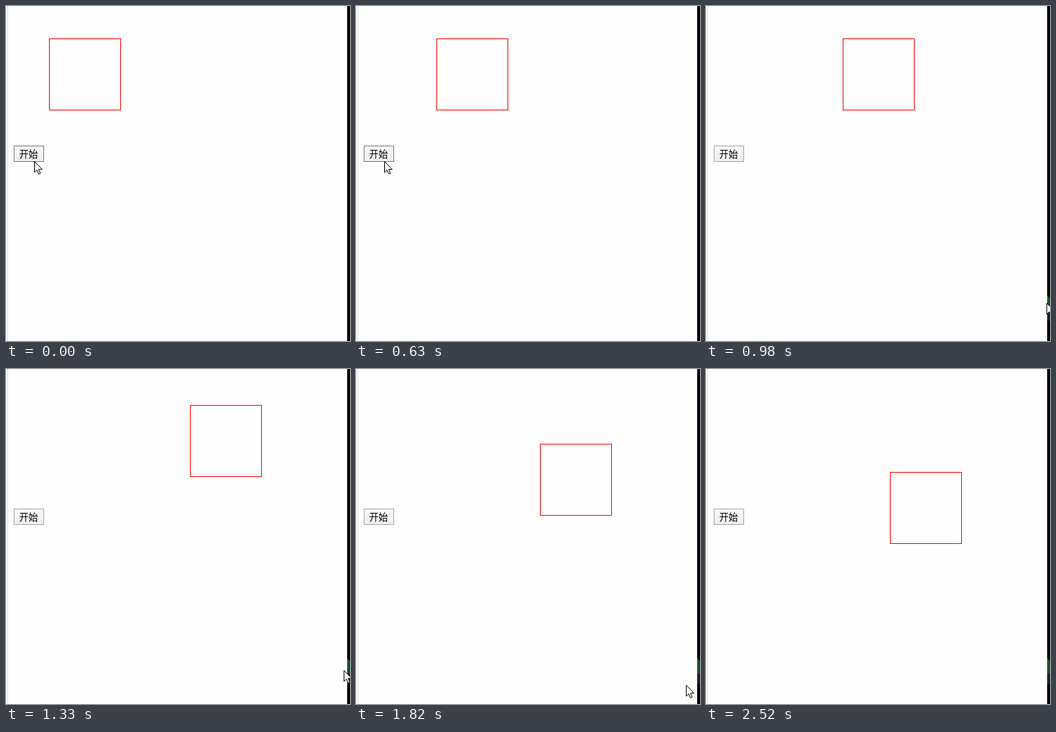
Recreate the animation shown at these times as an HTML page. Size 488 by 475 pixels, loop 2800 ms.

```html
<!DOCTYPE html>
<html lang="zh">
<head>
<meta charset="utf-8">
<style>
  html, body { margin: 0; width: 100%; height: 100%; overflow: hidden; background: #fefefe; }
  svg { display: block; }
  text { font: 13.33px "Noto Sans CJK SC", "Noto Sans CJK", sans-serif; }
</style>
</head>
<body>
<svg width="488" height="475" viewBox="0 0 488 475">
  <defs>
    <linearGradient id="face" x2="0" y2="1">
      <stop stop-color="#f8f8f8"/>
      <stop offset="1" stop-color="#eee"/>
    </linearGradient>
  </defs>
  <rect width="2" height="475" fill="#f6f6f6"/>
  <rect x="2" width="1" height="475" fill="#e2e2e2"/>
  <rect x="484" width="4" height="475"/>
  <g id="corner">
    <path d="M484 410L488 414V432H484Z" fill="#185228"/>
    <path d="M484 432H488V446H484Z" fill="#222"/>
  </g>
  <rect id="button" x="11.5" y="198.5" width="42" height="22" fill="url(#face)"/>
  <text x="18.7" y="214.5">开始</text>
  <rect id="box" width="101" height="101" fill="none" stroke="red"/>
  <path id="cursor" d="M.5 .5V16L4 12.6 6.4 18.3 8.8 17.3 6.4 11.7H11.4Z" fill="#fff" stroke="#000"/>
</svg>
<script>
const LOOP = 2800, STEP = 70, LAST = 2520;
const [corner, button, box, cursor] =
  ['corner', 'button', 'box', 'cursor'].map(id => document.getElementById(id));

// Pointer path: time, x, y
const path = [
  [0, 40, 220], [630, 40, 220], [700, 43, 222], [770, 340, 295],
  [840, 447, 370], [910, 478, 408], [980, 483, 421], [1330, 479, 427],
  [1610, 469, 435], [1960, 467, 457], [2100, 466, 461], [2240, 466, 476], [LOOP, 466, 476]
];

const progress = (t, start, length) => Math.min(1, Math.max(0, (t - start) / length));
const place = (el, x, y) =>
  el.setAttribute('transform', `translate(${Math.round(x)} ${Math.round(y)})`);

function pointer(t) {
  const i = path.findIndex(p => p[0] > t);
  const [t0, x0, y0] = path[i - 1], [t1, x1, y1] = path[i];
  const k = (t - t0) / (t1 - t0);
  return [x0 + (x1 - x0) * k, y0 + (y1 - y0) * k];
}

function draw(now) {
  const t = Math.min(LAST, Math.floor(now % LOOP / STEP) * STEP);
  // The box slides right, then down, at constant speed
  box.setAttribute('x', 61.5 + Math.round(200 * progress(t, 398, 875)));
  box.setAttribute('y', 46.5 + Math.round(100 * progress(t, 1285, 885)));
  place(cursor, ...pointer(t));
  button.setAttribute('stroke', t < 770 ? '#7c7c7c' : '#a6a6a6');
  corner.setAttribute('visibility', t < 980 ? 'hidden' : 'visible');
}

const start = performance.now();
function tick() {
  draw(performance.now() - start);
  requestAnimationFrame(tick);
}
tick();
</script>
</body>
</html>
```
